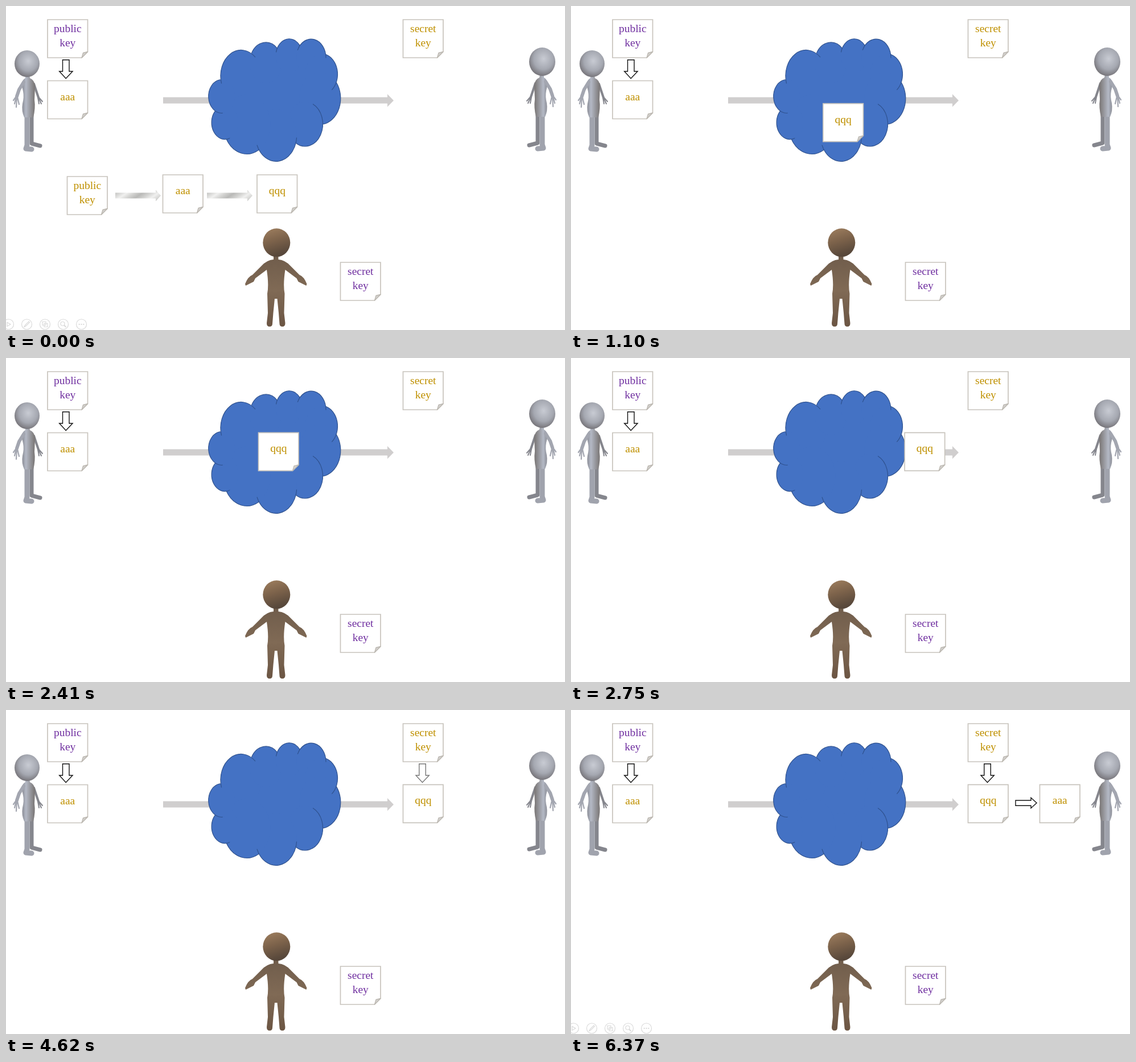
An HTML page that plays this animation: 982x570 px, repeating every 6450 ms.

```html
<!DOCTYPE html>
<html lang="en">
<head>
<meta charset="utf-8">
<title>Public key exchange</title>
<style>
  html, body { margin: 0; width: 100%; height: 100%; overflow: hidden; background: #fff; }
  svg { display: block; width: 982px; height: 570px; }
  text { font: 19.5px "Liberation Serif", serif; text-anchor: middle; }
  .purple { fill: #7030a0; }
  .gold { fill: #bf9000; }
  .sheet { fill: #fff; stroke: #c8c4bd; stroke-width: 1.7; }
  .fold { fill: #d3d1ce; stroke: #bcb8b1; stroke-width: 1.3; stroke-linejoin: round; }
  .outline { fill: #fff; stroke: #111; stroke-width: 1.4; }
  .limb { fill: none; stroke-linecap: round; stroke-linejoin: round; }
  #cloud { fill: #4472c4; }
  #cloud path { fill: none; stroke: #2f528f; stroke-width: 1.2; }
  #controls { fill: none; stroke: #dadada; stroke-width: 1.2; }
</style>
</head>
<body>
<svg viewBox="0 0 982 570">
  <defs>
    <radialGradient id="greyHead" cx=".55" cy=".4" r=".62">
      <stop offset="0" stop-color="#c8cbd3"/><stop offset=".6" stop-color="#a5a8b1"/><stop offset="1" stop-color="#747277"/>
    </radialGradient>
    <linearGradient id="greyBody">
      <stop offset="0" stop-color="#8a8c95"/><stop offset=".3" stop-color="#b4b9c5"/><stop offset="1" stop-color="#787473"/>
    </linearGradient>
    <linearGradient id="brownHead" x2=".3" y2="1">
      <stop offset="0" stop-color="#a08060"/><stop offset=".5" stop-color="#7d634b"/><stop offset="1" stop-color="#58483b"/>
    </linearGradient>
    <linearGradient id="brownBody" x2="0" y2="1">
      <stop offset="0" stop-color="#6f5c4b"/><stop offset=".5" stop-color="#806a55"/><stop offset="1" stop-color="#6b5543"/>
    </linearGradient>
    <linearGradient id="marble" gradientUnits="userSpaceOnUse" x2="9" y2="13" spreadMethod="reflect">
      <stop offset="0" stop-color="#b9b9b7"/><stop offset=".5" stop-color="#d2d2d0"/><stop offset="1" stop-color="#f0f0ef"/>
    </linearGradient>
    <path id="down" class="outline" d="M6.5 .8H18V21H24L12.2 33.5L.7 21H6.5Z"/>
    <path id="marbleArrow" fill="url(#marble)" d="M0 5H71V0L80 10L71 20V15H0Z"/>
    <g id="greyFigure">
      <g class="limb" stroke="#85868d">
        <path stroke-width="4" d="M49 137L57 161"/>
        <path stroke-width="2" d="M57 160L64 168M57 161L62 172M56 161L58 172"/>
        <path stroke-width="7" d="M45 190V242L60 246"/>
      </g>
      <path class="limb" stroke="#a0a3ad" stroke-width="9" d="M37 190V245L35 251L45 252"/>
      <path fill="url(#greyBody)" d="M34 121H41L42 127Q50 130 51 141L50 165Q52 180 48 196H32Q27 185 29 172Q32 160 30 150Q25 131 34 127Z"/>
      <g class="limb" stroke="#a3a6b0">
        <path stroke-width="6" d="M31 134L23 147L19 159"/>
        <path stroke-width="2.2" d="M18 159L13 166M18 160L15 172M19 160L18 178M20 160L23 173"/>
      </g>
    </g>
    <path id="brownHalf" fill="url(#brownBody)" d="M-.5 437H4V446Q16 447 25 457L41 473Q49 476 54 489L53 492L39 485L36 479L16 464Q12 490 15 506L14 540L16 558Q16 564 11 564Q6 564 6 559L4.5 540L2 515H-.5Z"/>
  </defs>

  <path fill="#d0cece" d="M276 160.5H670V155L681 166.3L670 177.5V171.5H276Z"/>
  <g id="cloud"><ellipse cx="470" cy="165" rx="85" ry="75"/></g>

  <use href="#greyFigure"/>
  <ellipse cx="37" cy="101.5" rx="22" ry="23.5" fill="url(#greyHead)"/>
  <use href="#greyFigure" transform="translate(979 -1) scale(-1 1)"/>
  <ellipse cx="942" cy="98" rx="23" ry="25" fill="url(#greyHead)"/>
  <use href="#brownHalf" x="474.5"/>
  <use href="#brownHalf" transform="translate(474 0) scale(-1 1)"/>
  <ellipse cx="475.3" cy="416.3" rx="24" ry="25" fill="url(#brownHead)"/>

  <g id="cards"></g>
  <use href="#down" x="93" y="94"/>
  <use href="#down" id="decryptArrow" x="719.3" y="94"/>
  <g id="result">
    <path class="outline" d="M781 159H808V154.3L818 163.5L808 172.7V168.3H781Z"/>
  </g>
  <g id="row">
    <use href="#marbleArrow" x="192" y="323.5"/>
    <use href="#marbleArrow" x="353" y="323.5"/>
  </g>
  <g id="message"></g>

  <g id="controls">
    <path d="M2 556.5L8 560L2 563.5Z"/>
    <path d="M31.5 565L34 561L40 555L41.5 556.5L35.5 562.5Z"/>
    <path d="M64 555.5h6v6h-6zm3 3h6v6h-6z"/>
    <circle cx="99.5" cy="559" r="3.5"/><path stroke-width="2" d="M102 561.5l3.5 3.5"/>
    <path stroke-width="2" stroke-dasharray="2 1.8" d="M127.7 560H138"/>
  </g>
</svg>
<script>
const LOOP = 6450, STEP = 80;
const $ = id => document.getElementById(id);
const append = (id, markup) => $(id).insertAdjacentHTML('beforeend', markup);

const card = (x, y, color, ...lines) => `<g transform="translate(${x} ${y})">
  <path class="sheet" d="M0 0H70.5V56.5L60 67H0Z"/>
  <path class="fold" d="M60 67L62.5 58.5L70.5 56.5Z"/>
  ${lines.map((line, i) => `<text class="${color}" x="35.3" y="${(lines.length > 1 ? 22 : 34) + 24.5 * i}">${line}</text>`).join('')}</g>`;

append('cards', card(73, 24, 'purple', 'public', 'key') + card(73, 131.5, 'gold', 'aaa')
  + card(697.5, 24, 'gold', 'secret', 'key') + card(587.5, 451, 'purple', 'secret', 'key'));
append('row', card(107.5, 300, 'gold', 'public', 'key') + card(275.5, 297, 'gold', 'aaa'));
append('result', card(823.5, 131.3, 'gold', 'aaa'));
append('message', card(0, 0, 'gold', 'qqq'));
for (let i = 0; i < 5; i++) append('controls', `<circle cx="${4.5 + 32 * i}" cy="560" r="9"/>`);

// Cloud lobes: centre, radius, and the visible arc in degrees, which runs on inside as a crease.
const TALL = 1.265;
const lobes = [
  [413, 123, 36, 163, 314], [456.5, 100, 28.5, 208, 315], [497.5, 87.5, 23.5, 192, 323],
  [536, 91, 26, 204, 361], [554, 120, 28.5, 285, 410], [551.5, 162.5, 36.3, 322, 442],
  [525.5, 207.7, 31, 296, 482], [474.5, 227.5, 36.2, 5, 158], [423, 208, 41.4, 59, 150],
  [384.5, 205, 23.4, 68, 223], [379, 159, 23.3, 86, 264]
];
const ellipses = lobes.map(([x, y, r]) => `<ellipse cx="${x}" cy="${y}" rx="${r}" ry="${r * TALL}"/>`);
const arcs = lobes.map(([x, y, r, from, to]) => {
  const at = degrees => {
    const a = degrees * Math.PI / 180;
    return [x + r * Math.cos(a), y + r * TALL * Math.sin(a)];
  };
  return `<path d="M${at(from)}A${r} ${r * TALL} 0 ${+(to - from > 180)} 1 ${at(to)}"/>`;
});
append('cloud', [...ellipses, ...arcs].join(''));

const progress = (t, start, duration) => Math.min(1, Math.max(0, (t - start) / duration));
const ease = u => u < .5 ? 2 * u * u : 1 - 2 * (1 - u) ** 2;
const mix = (a, b, u) => a + (b - a) * u;
// Motion advances in discrete steps counted from an origin.
const held = (t, origin) => origin + Math.floor((t - origin) / STEP) * STEP;
const move = (t, origin, start) => ease(progress(held(t, origin), start, 502));
const fade = (t, start) => progress(held(t, start), start - 50, 370);
const show = (id, visible) => $(id).style.display = visible ? '' : 'none';

// Each click hides the controls for a while.
const clicks = [[700, 1030], [2410, 1020], [3990, 940], [5420, 950]];

function draw(t) {
  const rise = move(t, 700, 773), slide = move(t, 2430, 2483);
  const x = mix(mix(441, 443.5, rise), 697.5, slide);
  const y = mix(297, 131.4, rise);
  $('message').setAttribute('transform', `translate(${x} ${y})`);
  show('row', t < 770);
  show('controls', !clicks.some(([at, hidden]) => t >= at && t < at + hidden));
  $('decryptArrow').style.opacity = fade(t, 4390);
  $('result').style.opacity = fade(t, 5750);
}

function tick() {
  draw(performance.now() % LOOP);
  requestAnimationFrame(tick);
}
tick();
</script>
</body>
</html>
```
